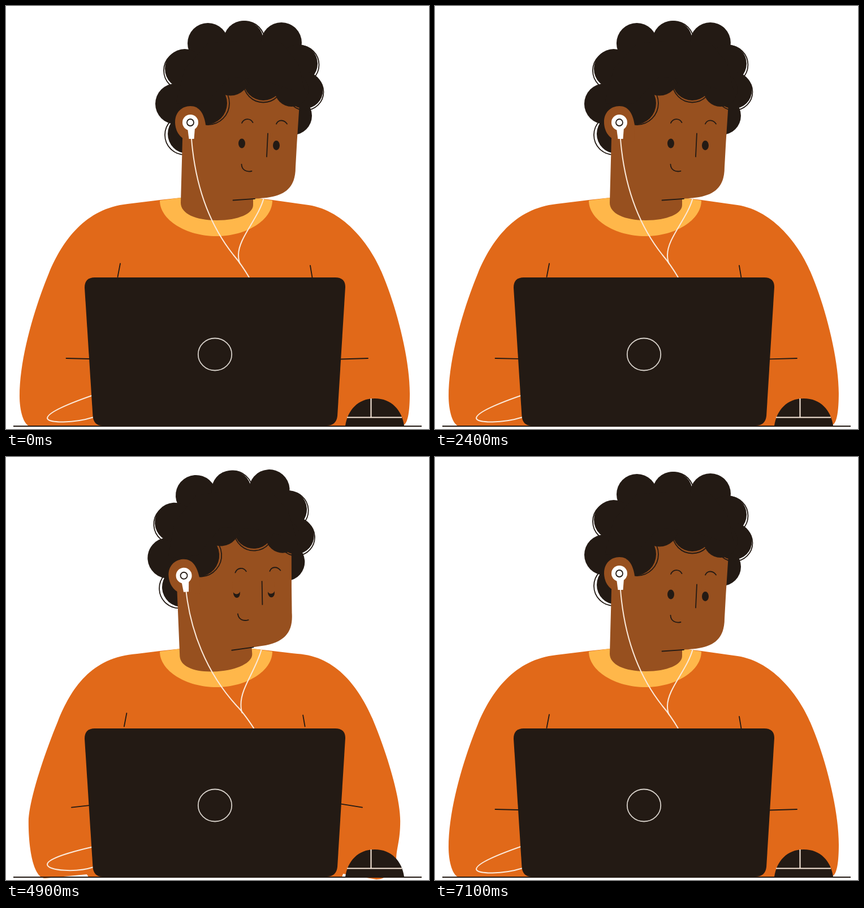
Recreate the animation shown at these times as an HTML page. Size 748 by 748 pixels, loop 7.2 s.

```html
<!DOCTYPE html>
<html lang="en">
<head>
<meta charset="utf-8">
<title>At the laptop</title>
<style>
  html, body { margin: 0; height: 100%; overflow: hidden; background: #fff; }
  svg { display: block; width: 100%; height: 100%; }
  .skin { fill: #97501f; }
  .dark { fill: #231a14; }
  .line { fill: none; stroke: #231a14; stroke-width: 1.8; stroke-linecap: round; }
  .wire { fill: none; stroke: #fbeadb; stroke-width: 2; }
  .lid { stroke: #97501f; stroke-width: 13; stroke-linecap: round; }
</style>
</head>
<body>
<svg viewBox="0 0 748 748">
  <path id="body" fill="#e16919"/>
  <path fill="#ffb74a" d="M272 344L309 339H437L471 344C471 378 426 407 372 407S272 378 272 344Z"/>
  <path id="wireRight" class="wire"/>

  <g id="head">
    <g id="backHair"></g>
    <path class="skin" d="M313 200L309 348C309 367 335 379 373 379S437 367 437 352V341L455 339.5C497 336 512 318 512 285L514.5 240L519 172L420 100L330 160Z"/>
    <path class="line" d="M401.500 343.500L440 340.800"/>
    <g id="frontHair"></g>
    <path class="skin" d="M313 234C301 226 299 212 299 205C299 188 311 177 326 177C342 177 350 190 353 210V240Z"/>
    <path fill="#fff" d="M321 216H334L332.500 235H323.500Z"/>
    <circle cx="326" cy="206" r="14" fill="#fff"/>
    <circle cx="326" cy="206" r="6" class="line"/>
    <g class="dark">
      <ellipse cx="417" cy="243" rx="6" ry="8.500"/>
      <ellipse cx="478" cy="246.500" rx="6" ry="8.500"/>
    </g>
    <path id="lids" class="lid"/>
    <path class="line" d="M417 207C421 198 432 198 436.500 206M478 208.500C482 200 492 201 497 208.500M463 225.500L461 266.500M416.500 280C417 290 425 294 434.500 292"/>
  </g>

  <path id="wireLeft" class="wire"/>
  <path id="folds" class="line"/>
  <path id="mouseWire" class="wire"/>
  <path class="dark" d="M157 480H582Q600 480 600 497L586 725Q584 742 567 742H170Q155 742 153.500 725L139 498Q139 480 157 480Z"/>
  <ellipse cx="369.500" cy="616" rx="29.700" ry="28.500" fill="none" stroke="#d8d2cb" stroke-width="1.800"/>
  <path class="dark" d="M600 742C604 715 622 694 652 694S700 715 704 742Z"/>
  <path class="wire" d="M603 727.500H700M645.500 694V727"/>
  <path class="line" style="stroke-width:2;stroke-linecap:butt" d="M13 743H735"/>
</svg>
<script>
const $ = id => document.getElementById(id);

// Curls: x, y, radius, then the offset of a loose outline behind the curl
const backCurls = [[321, 226, 35, -5, 2], [507, 194, 34]];
const frontCurls = [
  [357, 66, 36], [420, 61, 35, 2.5, 1], [487, 65, 36],
  [517, 102, 34, 2.5, 2], [528, 149, 32.5, 1, 3], [505, 148, 30],
  [455, 132, 35, 0, 3.5], [397, 125, 33.5], [353, 172, 38, 4, 0],
  [300, 173, 36], [316, 111, 35, -2, 3]
];
const circle = (cls, x, y, r) => `<circle class="${cls}" cx="${x}" cy="${y}" r="${r}"/>`;
const curls = list =>
  list.filter(c => c.length > 3).map(([x, y, r, dx, dy]) => circle('line', x + dx, y + dy, r)).join('') +
  list.map(([x, y, r]) => circle('dark', x, y, r)).join('');
$('backHair').innerHTML = curls(backCurls);
$('frontHair').innerHTML = curls(frontCurls) +
  `<polygon class="dark" points="${frontCurls.map(c => c.slice(0, 2))}"/>`;

// Each path at rest and fully leaned; both have the same structure
const poses = {
  body: [
    'M272 343L215 350C140 358 100 415 76 472C52 530 24 620 24 690C24 715 31 742 43 743L143 743L146 743L600 743L602 743L655 743C680 743 702 742 703 741C711 738 714 715 714 685C714 620 688 525 664 470C645 425 600 362 535 352L471 343L437 339L309 339Z',
    'M272 343L232 348C150 354 115 410 92 467C66 530 40 610 40 645C40 690 48 745 70 745L143 738L146 743L594 743L596 737L655 747C670 747 688 735 690 712C690 690 697 680 697 643C697 600 672 520 648 463C625 410 585 352 515 348L472 343L437 339L309 339Z'
  ],
  wireLeft: [
    'M328 235C334 310 356 382 402 440C413 453 420 463 430 480',
    'M318.500 238C326 305 353 380 408 440C418 450 428 464 438.500 480'
  ],
  wireRight: [
    'M456 339C447 375 411 410 411 440C411 447 412 452 414 456',
    'M452 339C443 375 415 408 415.500 438C415.500 445 416 449 418 453'
  ],
  folds: [
    'M202 455.500L197.500 479M538 459L541.500 480M106.500 623L148 624M592 624.500L640 623',
    'M213.500 453L209 476.500M525 456.500L528.500 476.500M116 619.500L147 616M593 613.500L630 619.500'
  ],
  mouseWire: [
    'M153 688.500C120 700 73 718 73 729C75 738 120 738 155 727',
    'M153 689.500C120 697 73 710 73 720.500C74 732 125 735 155 725'
  ]
};
const number = /[\d.]+/g;
function mix([a, b], p) {
  const ends = b.match(number);
  let i = 0;
  return a.replace(number, n => (+n + (ends[i++] - n) * p).toFixed(2));
}

const CYCLE = 3600, LEAN = 2450, STEP = 100;

function draw(now) {
  const t = Math.floor(now / STEP) * STEP;
  const c = t % CYCLE;
  const lean = c < LEAN ? (1 - Math.cos(2 * Math.PI * c / LEAN)) / 2 : 0;
  for (const id in poses) $(id).setAttribute('d', mix(poses[id], lean));
  $('head').setAttribute('transform', `rotate(${-3.95 * lean} 375 375)`);

  // Blink twice per cycle
  const away = Math.abs(t % 1800 - 1300);
  const drop = Math.max(-16, -4.5 - away * 0.06);
  $('lids').setAttribute('d', `M417 224V${243 + drop}M478 227V${246.5 + drop}`);
}

const start = performance.now();
(function tick() {
  draw(performance.now() - start);
  requestAnimationFrame(tick);
})();
</script>
</body>
</html>
```
